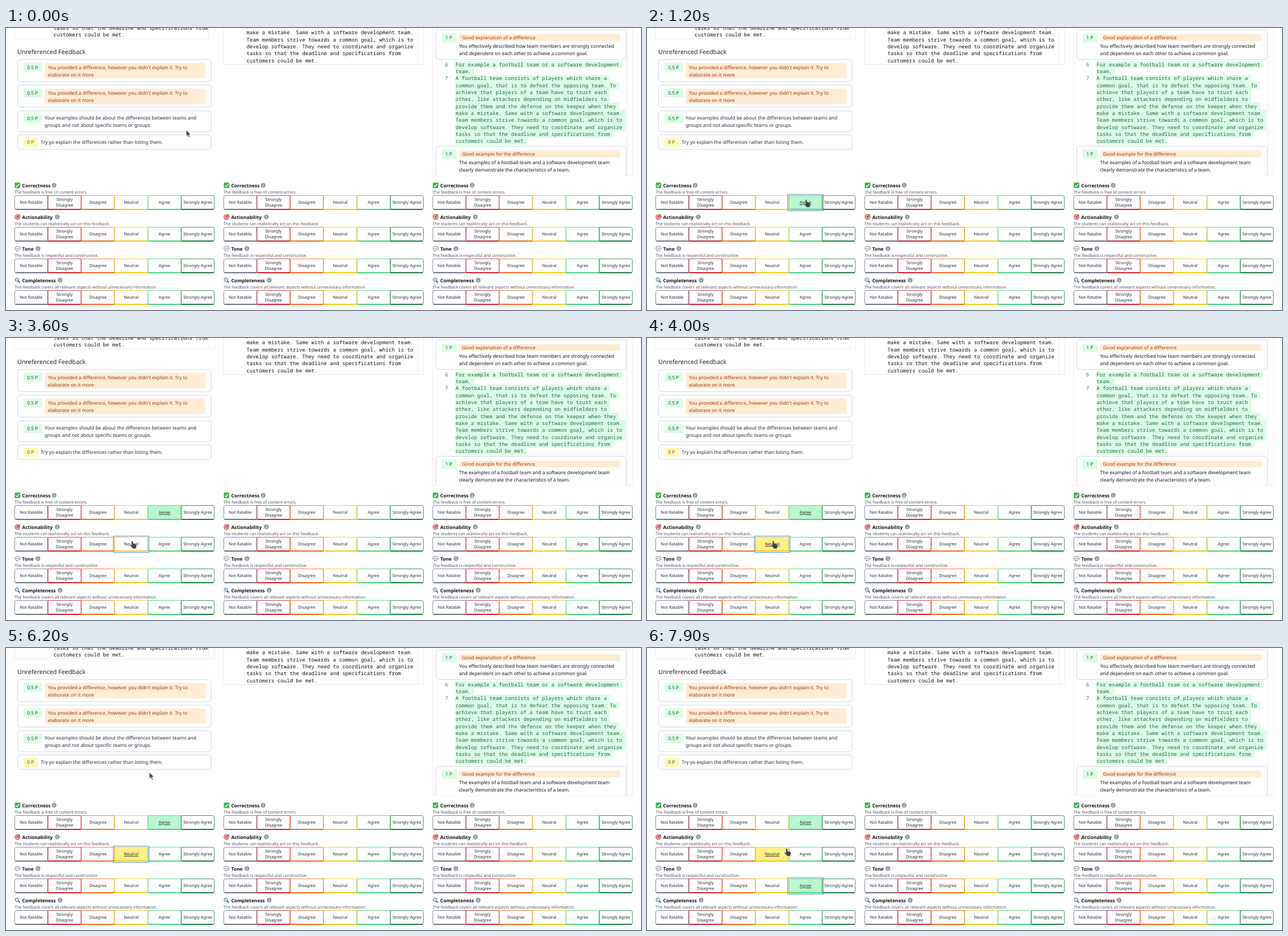
An HTML page that plays this animation: 1122x499 px, repeating every 8000 ms.

```html
<!DOCTYPE html>
<html lang="en">
<head>
<meta charset="utf-8">
<title>Feedback rating</title>
<style>
html, body { margin: 0; width: 100%; height: 100%; overflow: hidden; background: #fff; }
svg { display: block; width: 1122px; height: 499px; }
text { font-family: "Noto Sans", "Open Sans", sans-serif; text-rendering: geometricPrecision; }
.code { font: 9.1px "Noto Sans Mono", "DejaVu Sans Mono", monospace; }
.body { font-size: 8.47px; }
.head { font-size: 10.8px; fill: #212529; }
.title { font-size: 8.45px; font-weight: 600; fill: #111; }
.sub { font-size: 7.23px; fill: #4b5563; }
.label { font-size: 7.35px; fill: #1f2937; text-anchor: middle; }
</style>
</head>
<body>
<svg id="stage" viewBox="0 0 1122 499" xmlns="http://www.w3.org/2000/svg"></svg>
<script>
const LOOP = 8000, COL = 369.35, ROW = 56, BTN = 58.9, LEFT = 15, TOP = 296.5;
const stage = document.getElementById("stage");

const text = (x, y, s, cls, fill = "#1f2937") =>
  `<text x="${x}" y="${y}" class="${cls}" fill="${fill}">${s}</text>`;
const box = (x, y, w, h, fill, r = 0, stroke = "none") =>
  `<rect x="${x}" y="${y}" width="${w}" height="${h}" rx="${r}" fill="${fill}" stroke="${stroke}"/>`;
const line = (d, stroke = "#ededf0", w = 1) =>
  `<path d="${d}" fill="none" stroke="${stroke}" stroke-width="${w}"/>`;

const GREEN = "#dcfce7", DARK_GREEN = "#166534", ORANGE = "#ffecd4", RUST = "#9a3412", EDGE = "#d5d8de";

const essay = [
  "For example a football team or a software development",
  "team.",
  "A football team consists of players which share a",
  "common goal, that is to defeat the opposing team. To",
  "achieve that players of a team have to trust each",
  "other, like attackers depending on midfielders to",
  "provide them and the defense on the keeper when they",
  "make a mistake. Same with a software development team.",
  "Team members strive towards a common goal, which is to",
  "develop software. They need to coordinate and organize",
  "tasks so that the deadline and specifications from",
  "customers could be met."
];

// The last `n` essay lines, ending on baseline `end`
function code(x, end, n, marked) {
  const pitch = 12.35, first = essay.length - n;
  let marks = "", words = "";
  essay.slice(first).forEach((s, i) => {
    const y = end - (n - 1 - i) * pitch;
    const tail = i === n - 1 ? 0 : 1;
    if (marked) marks += box(x, y - 9.4, (s.length + tail) * 5.46, pitch + .1, GREEN);
    words += text(x, y, s, "code", marked ? "#1f6b3f" : "#111");
  });
  return marks + words;
}

function frame(col, bottom) {
  const x = LEFT + col * COL;
  return line(`M${x} 0V${bottom}H${x + 353.5}V0M${x + 343.5} 0V${bottom}`);
}

function chip(x, y, w, s, fill = GREEN, ink = DARK_GREEN) {
  return box(x, y, w, 16, fill, 2) + text(x + 6.2, y + 11, s, "body", ink);
}

function remark(y, h, lines, warn) {
  let s = box(20.5, y, 342, h, "#fff", 5, EDGE) + chip(31, y + 5.7, 33, "0.5 P");
  if (warn) s += box(68.5, y + 6.3, 284, 27.2, ORANGE, 2);
  lines.forEach((l, i) =>
    s += text(warn ? 74 : 68.3, y + (warn ? 17 : 15.3) + i * 13, l, "body", warn ? RUST : "#1f2937"));
  return s;
}

function praise(y, title, a, b) {
  return box(759.5, y, 336.5, 52.5, "#fff", 5, EDGE) + chip(770, y + 6, 26, "1 P") +
    box(800.5, y + 7.6, 284.5, 12, ORANGE, 2) + text(805.7, y + 16.7, title, "body", RUST) +
    text(800.5, y + 31.3, a, "body", "#111") + text(800.5, y + 44.4, b, "body", "#111");
}

// Small pictograms on a 10 by 10 field
const icons = [
  box(.3, .3, 9.6, 9.6, "#3fae49", 1.5) + line("M2.3 5.3L4.3 7.5L8 2.5", "#fff", 1.4),
  `<circle cx="5" cy="5.2" r="4.8" fill="#d9342b"/><circle cx="5" cy="5.2" r="3.4" fill="#fff"/>
   <circle cx="5" cy="5.2" r="2.4" fill="#d9342b"/><circle cx="5" cy="5.2" r="1" fill="#fff"/>` +
   line("M5 5.2L8.6 1.6", "#4a5a66", 1.1) + line("M8 2.2L8.4 .4M8 2.2L10 1.7", "#3a87c8", 1.2),
  `<path d="M5.2 1C8 1 10 2.4 10 4.5S8 8 5.2 8L3 9.6L2.9 7.6C1.4 7 .5 6 .5 4.5C.5 2.4 2.5 1 5.2 1Z"
    fill="#fff" stroke="#4b5560" stroke-width=".8"/>` +
   [3, 5.2, 7.4].map(x => `<circle cx="${x}" cy="4.6" r=".75" fill="#4b5560"/>`).join(""),
  line("M6.2 6.2L9.4 9.4", "#4a4f57", 1.8) +
   `<circle cx="4" cy="4" r="3.2" fill="#bfe3f5" stroke="#64778a" stroke-width="1"/>`
];

const criteria = [
  ["Correctness", "The feedback is free of content errors.", 85],
  ["Actionability", "The students can realistically act on this feedback.", 90.6],
  ["Tone", "The feedback is respectful and constructive.", 56.4],
  ["Completeness", "The feedback covers all relevant aspects without unnecessary information.", 95.6]
];
const choices = [
  ["Not Ratable", "#6b7280"], ["Strongly Disagree", "#cf2030"], ["Disagree", "#f4691e"],
  ["Neutral", "#f6c915"], ["Agree", "#41d67a"], ["Strongly Agree", "#15803d"]
];

function button(col, row, i) {
  const [name, c] = choices[i];
  const x = LEFT + col * COL + i * BTN + .4, y = TOP + row * ROW, w = BTN - .8, h = 24.6;
  const l = i === 0 ? 3 : 0, r = i === 5 ? 3 : 0;
  const shape = `M${x + l} ${y}H${x + w - r}q${r} 0 ${r} ${r}V${y + h - r}q0 ${r} ${-r} ${r}` +
    `H${x + l}q${-l} 0 ${-l} ${-l}V${y + l}q0 ${-l} ${l} ${-l}Z`;
  const mid = x + w / 2;
  const label = i === 1
    ? text(mid, y + 9.7, "Strongly", "label") + text(mid, y + 19.7, "Disagree", "label")
    : text(mid, y + 14.9, name, "label");
  const id = col === 0 ? ` id="b${row}${i}"` : "";
  return `<g${id}>` + line(shape, c, .85) +
    line(`M${x + l * .4} ${y + h - .1}H${x + w - r * .4}`, c, 2) + label + "</g>";
}

function rating(col, row) {
  const x = LEFT + col * COL, y = row * ROW, [title, sub, info] = criteria[row];
  const ix = info + col * COL;
  let s = `<g transform="translate(${x + .2} ${273.3 + y})">${icons[row]}</g>` +
    text(x + 13.6, 281.6 + y, title, "title", "#111") + text(x, 292.7 + y, sub, "sub") +
    `<circle cx="${ix}" cy="${278.3 + y}" r="4.2" fill="#9299a6"/>` +
    line(`M${ix} ${277.7 + y}v3M${ix} ${275.7 + y}v1.1`, "#fff", 1.1);
  for (let i = 0; i < 6; i++) s += button(col, row, i);
  return s;
}

// Clicks in the first column: focus span and start of the fill
const picks = [
  { row: 0, i: 4, on: 900, off: 3600, fill: 1000, tint: "#baf6d0" },
  { row: 1, i: 3, on: 3600, off: 7500, fill: 3800, tint: "#ffef88" },
  { row: 2, i: 4, on: 7500, off: LOOP, fill: 7600, tint: "#baf6d0" }
];

function build() {
  let s = frame(0, 19) + code(84, 15.4, 2) + frame(1, 64.5) + code(425, 60.8, 6) + frame(2, 261);
  s += text(20, 45.6, "Unreferenced Feedback", "head");
  const ask = ["You provided a difference, however you didn't explain it. Try to", "elaborate on it more"];
  s += remark(55.8, 39, ask, true) + remark(101, 39, ask, true) +
    remark(146.5, 37, ["Your examples should be about the differences between teams and",
      "groups and not about specific teams or groups."], false);
  s += box(20.5, 189, 342, 26, "#fff", 5, EDGE) + chip(31, 194, 26, "0 P", "#fef9b8", "#854d0e") +
    text(61.6, 204.6, "Try yo explain the differences rather than listing them.", "body");

  s += `<clipPath id="cut"><rect x="750" width="372" height="261"/></clipPath><g clip-path="url(#cut)">` +
    code(794.3, 203.4, 12, true) +
    text(775.8, 67.6, "6", "code", "#237893") + text(775.8, 92.3, "7", "code", "#237893") +
    praise(3.2, "Good explanation of a difference",
      "You effectively described how team members are strongly connected",
      "and dependent on each other to achieve a common goal.") +
    praise(209.3, "Good example for the difference",
      "The examples of a football team and a software development team",
      "clearly demonstrate the characteristics of a team.") + "</g>";

  picks.forEach((p, n) =>
    s += `<g id="fill${n}">${box(LEFT + p.i * BTN + .4, TOP + p.row * ROW, BTN - .8, 24.6, p.tint)}</g>`);
  for (let col = 0; col < 3; col++)
    for (let row = 0; row < 4; row++) s += rating(col, row);
  picks.forEach((p, n) =>
    s += `<g id="ring${n}">${box(LEFT + p.i * BTN - 2.1, 294.5 + p.row * ROW, BTN + 4.2, 29, "none", 0, "#5b93d3")}</g>`);

  s += `<path id="arrow" d="M0 0V10.6L2.6 8.4L4.6 12.7L6.4 11.9L4.5 7.8L7.6 7.4Z" fill="#444" stroke="#fff" stroke-width=".4"/>
    <path id="hand" d="M-1.4 1.3Q-1.2 0 0 0Q1.2 .1 1.4 1.4L1.9 4.7L6 5.6Q8 6.2 7.8 8.3L7 11.2V13.8H.2V12L-3.7 8.5Q-4.2 7.3-3 7L-.7 8Z"
      fill="#3d4145" stroke="#fff" stroke-width=".4"/>`;
  stage.innerHTML = s;
}

// Pointer hot spot: time, x, y
const path = [
  [100, 318.5, 180.8], [700, 281, 303.5], [1900, 281, 303.5], [2100, 277, 305], [2200, 277, 305],
  [2300, 289, 308], [2500, 269.5, 309.7], [3000, 223, 359], [4800, 223, 359], [5400, 168.5, 222],
  [5500, 170.6, 216.3], [5700, 173.2, 216.3], [5800, 175.3, 217.3], [5900, 175.3, 217.3],
  [6200, 253.4, 220.4], [6600, 253.4, 220.4], [7000, 285.3, 407.9], [7300, 277, 423],
  [7700, 277, 423], [7900, 246.5, 354.5]
];

function pointer(t) {
  if (t <= path[0][0]) return path[0].slice(1);
  const k = path.findIndex(p => p[0] >= t);
  if (k < 0) return path[path.length - 1].slice(1);
  const a = path[k - 1], b = path[k], u = (t - a[0]) / (b[0] - a[0]), e = u * u * (3 - 2 * u);
  return [a[1] + (b[1] - a[1]) * e, a[2] + (b[2] - a[2]) * e];
}

const byId = id => document.getElementById(id);
const show = (id, on) => byId(id).setAttribute("visibility", on ? "visible" : "hidden");

function draw(now) {
  const t = Math.floor((now % LOOP) / 100) * 100;
  picks.forEach((p, n) => {
    show("ring" + n, t >= p.on && t < p.off);
    byId("fill" + n).setAttribute("opacity", Math.max(0, Math.min(1, (t - p.fill + 100) / 300)));
    byId(`b${p.row}${p.i}`).setAttribute("text-decoration", t >= p.fill ? "underline" : "none");
  });
  const [x, y] = pointer(t);
  const dy = y - TOP + 1;
  const over = dy >= 0 && dy % ROW < 27 && x > LEFT && x < LEFT + 6 * BTN;
  for (const id of ["arrow", "hand"]) byId(id).setAttribute("transform", `translate(${x} ${y})`);
  show("arrow", !over);
  show("hand", over);
}

build();
const start = performance.now();
function tick() {
  draw(performance.now() - start);
  requestAnimationFrame(tick);
}
tick();
</script>
</body>
</html>
```
